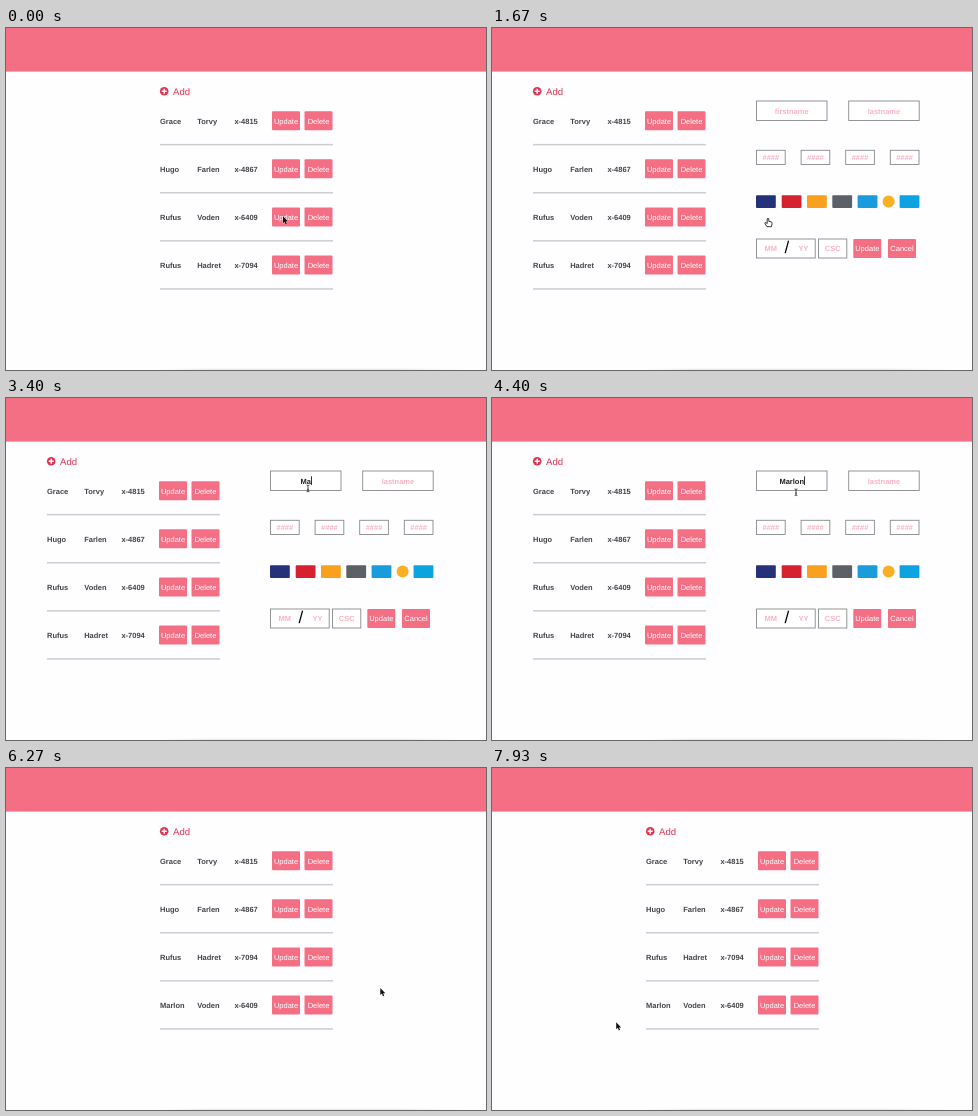
Write an HTML page that moves like this. It is 480x342 px and loops after 8 s.

```html
<!DOCTYPE html>
<html lang="en">
<head>
<meta charset="utf-8">
<title>Contact list</title>
<style>
  html, body { margin: 0; width: 100%; height: 100%; overflow: hidden; background: #fefdff; }
  svg { display: block; width: 100vw; height: 100vh; }
  text { font: 7.5px "Liberation Sans", Arial, sans-serif; text-rendering: geometricPrecision; }
  .bold { font-weight: bold; fill: #444; }
  .hint { font-weight: bold; fill: #fbb3c2; }
  .mid { text-anchor: middle; }
  .btn { fill: #f46f83; }
  .label { fill: #fff; }
  .field { fill: #fff; stroke: #8b8b8b; stroke-width: .9; }
  .rule { fill: #cfcdd0; }
  .add { fill: #df3550; }
</style>
</head>
<body>
<svg id="stage" viewBox="0 0 480 342">
  <defs>
    <linearGradient id="edge">
      <stop offset="0" stop-color="#eeecef" stop-opacity="0"/>
      <stop offset=".15" stop-color="#eeecef"/>
      <stop offset=".8" stop-color="#eeecef"/>
      <stop offset="1" stop-color="#eeecef" stop-opacity="0"/>
    </linearGradient>
  </defs>
  <rect width="480" height="43.6" class="btn"/>
  <rect x="152" y="340.6" width="306" height="1.4" fill="url(#edge)"/>
  <g id="list">
    <circle cx="158.2" cy="63.3" r="4.3" class="add"/>
    <path d="M155.7 63.3h5M158.2 60.8v5" stroke="#fff" stroke-width="1.4"/>
    <text x="167" y="66.8" class="add" style="font-size:9.6px">Add</text>
  </g>
  <g id="form"></g>
  <g id="cursor">
    <path id="arrow" d="M0 0V7L1.6 5.6 2.7 8.2 3.9 7.6 2.8 5.2H5Z"
      fill="#111" stroke="#fff" stroke-width=".6" paint-order="stroke"/>
    <path id="hand" d="M-.8.8Q0-.5.8.8V3.3L3 3.8Q4.3 4.2 4.1 5.6L3.4 8.7H-1L-3 5.7Q-3.3 4.3-2 4.6L-.8 5.6Z"
      fill="#fff" stroke="#222" stroke-width=".9"/>
    <path id="beam" d="M-1.4-3.3Q0-3.2 0-2.4Q0-3.2 1.4-3.3M0-2.4V2.6M-1.4 3.4Q0 3.3 0 2.5Q0 3.3 1.4 3.4M-.9.9H.9"
      fill="none" stroke="#222" stroke-width=".8"/>
  </g>
</svg>
<script>
const LOOP = 8000, FPS = 15;
const $ = id => document.getElementById(id);
const list = $('list'), form = $('form');

function add(parent, tag, attrs, text = '') {
  const el = document.createElementNS('http://www.w3.org/2000/svg', tag);
  for (const k in attrs) el.setAttribute(k, attrs[k]);
  el.textContent = text;
  parent.append(el);
  return el;
}
const rect = (g, x, y, width, height, cls) => add(g, 'rect', { x, y, width, height, class: cls });
const label = (g, x, y, text, cls) => add(g, 'text', { x, y, class: cls }, text);

function button(g, x, y, text) {
  rect(g, x, y, 28, 19, 'btn').setAttribute('rx', 1);
  label(g, x + 14, y + 12.3, text, 'label mid');
}
function field(x, y, w, h, hint) {
  rect(form, x, y, w, h, 'field');
  return label(form, x + w / 2, y + h / 2 + 2.8, hint, 'hint mid');
}

// People list
const before = [
  ['Grace', 'Torvy', 'x-4815'],
  ['Hugo', 'Farlen', 'x-4867'],
  ['Rufus', 'Voden', 'x-6409'],
  ['Rufus', 'Hadret', 'x-7094']
];
const after = [before[0], before[1], before[3], ['Marlon', 'Voden', 'x-6409']];
const cells = before.map((row, i) => {
  const y = 83.2 + i * 48.1;
  button(list, 266, y, 'Update');
  button(list, 298.5, y, 'Delete');
  rect(list, 154, y + 32.7, 173, 1.5, 'rule');
  return row.map((s, j) => label(list, [154, 191.2, 228.4][j], y + 12.4, s, 'bold'));
});

// Edit form
const first = field(264.5, 73, 70.5, 19.5, 'firstname');
field(356.7, 73, 70.5, 19.5, 'lastname');
for (let i = 0; i < 4; i++) field(264.5 + i * 44.6, 122.3, 28.7, 14.2, '####');
['#253279', '#d5222e', '#f9a11d', '#5c6167', '#1a9bdc', '', '#0ba4e0'].forEach((c, i) => {
  if (c) add(form, 'rect', { x: [264, 289.7, 315, 340.3, 365.6, 0, 407.6][i], y: 167.3, width: 19.8, height: 12.8, rx: 1, fill: c });
  else add(form, 'circle', { cx: 396.6, cy: 173.6, r: 6, fill: '#f9b022' });
});
rect(form, 264.5, 211, 58.7, 19, 'field');
label(form, 278.7, 223.3, 'MM', 'hint mid');
label(form, 311.5, 223.3, 'YY', 'hint mid');
label(form, 292.6, 225.3, '/', '').style.fontSize = '17px';
field(326.5, 211, 28.3, 19, 'CSC');
button(form, 361.3, 211, 'Update');
button(form, 396, 211, 'Cancel');
const caret = rect(form, 0, 78.3, .8, 8.7, '');

// [ms, x, y, shape]
const path = [
  [0, 277, 188.3, 'arrow'], [270, 283, 184, 'hand'], [530, 284, 182, 'hand'], [870, 277, 192.2, 'hand'],
  [1070, 282, 186, 'hand'], [1200, 276, 190, 'hand'], [1800, 276, 190, 'arrow'], [1930, 272, 174, 'arrow'],
  [2200, 294, 104, 'beam'], [2330, 301, 90.4, 'beam'], [3070, 301, 90.4, 'beam'], [3130, 302, 90.4, 'beam'],
  [4330, 302, 90.4, 'beam'], [4470, 306, 98, 'arrow'], [4730, 349, 172, 'arrow'],
  [4930, 371, 213, 'hand'], [5070, 375.2, 220.6, 'hand'], [6200, 374.3, 220, 'arrow'],
  [7000, 374.3, 220, 'arrow'], [7200, 320, 216, 'arrow'], [7400, 235, 214.5, 'arrow'], [7530, 203, 215.5, 'arrow'],
  [7660, 203, 215.5, 'arrow'], [7800, 140, 235, 'arrow'], [7870, 120, 250, 'arrow'], [7930, 124.2, 254.2, 'arrow']
];
const typed = [[3070, 1], [3400, 2], [3530, 3], [4000, 4], [4070, 5], [4130, 6]];
const lastKey = (keys, t) => keys.findLastIndex(k => k[0] <= t + 5);

function moveCursor(t) {
  const i = Math.max(0, lastKey(path, t));
  const a = path[i], b = path[i + 1] || a;
  const p = b === a ? 0 : Math.max(0, (t - a[0]) / (b[0] - a[0]));
  const at = k => a[k] + (b[k] - a[k]) * p;
  $('cursor').setAttribute('transform', `translate(${at(1)} ${at(2)})`);
  for (const s of ['arrow', 'hand', 'beam']) $(s).style.display = s === a[3] ? '' : 'none';
}

function draw(ms) {
  const t = Math.floor((ms + 5) * FPS / 1000) * 1000 / FPS;
  const open = t > 1460 && t < 6190;
  list.setAttribute('transform', `translate(${open ? -113 : 0} 0)`);
  form.style.display = open ? '' : 'none';

  const rows = t > 5790 ? after : before;
  cells.forEach((row, i) => row.forEach((c, j) => { c.textContent = rows[i][j]; }));

  const k = lastKey(typed, t);
  first.textContent = k < 0 ? 'firstname' : 'Marlon'.slice(0, typed[k][1]);
  first.setAttribute('class', k < 0 ? 'hint mid' : 'bold mid');
  first.style.fill = k < 0 ? '' : '#222';
  const blink = t > 2460 && t < 2925;
  caret.style.display = blink || (k >= 0 && t < 5260) ? '' : 'none';
  if (open) caret.setAttribute('x', k < 0 ? 299.8 : 299.9 + first.getComputedTextLength() / 2);
  moveCursor(t);
}

const start = performance.now();
function tick() {
  draw((performance.now() - start) % LOOP);
  requestAnimationFrame(tick);
}
tick();
</script>
</body>
</html>
```
